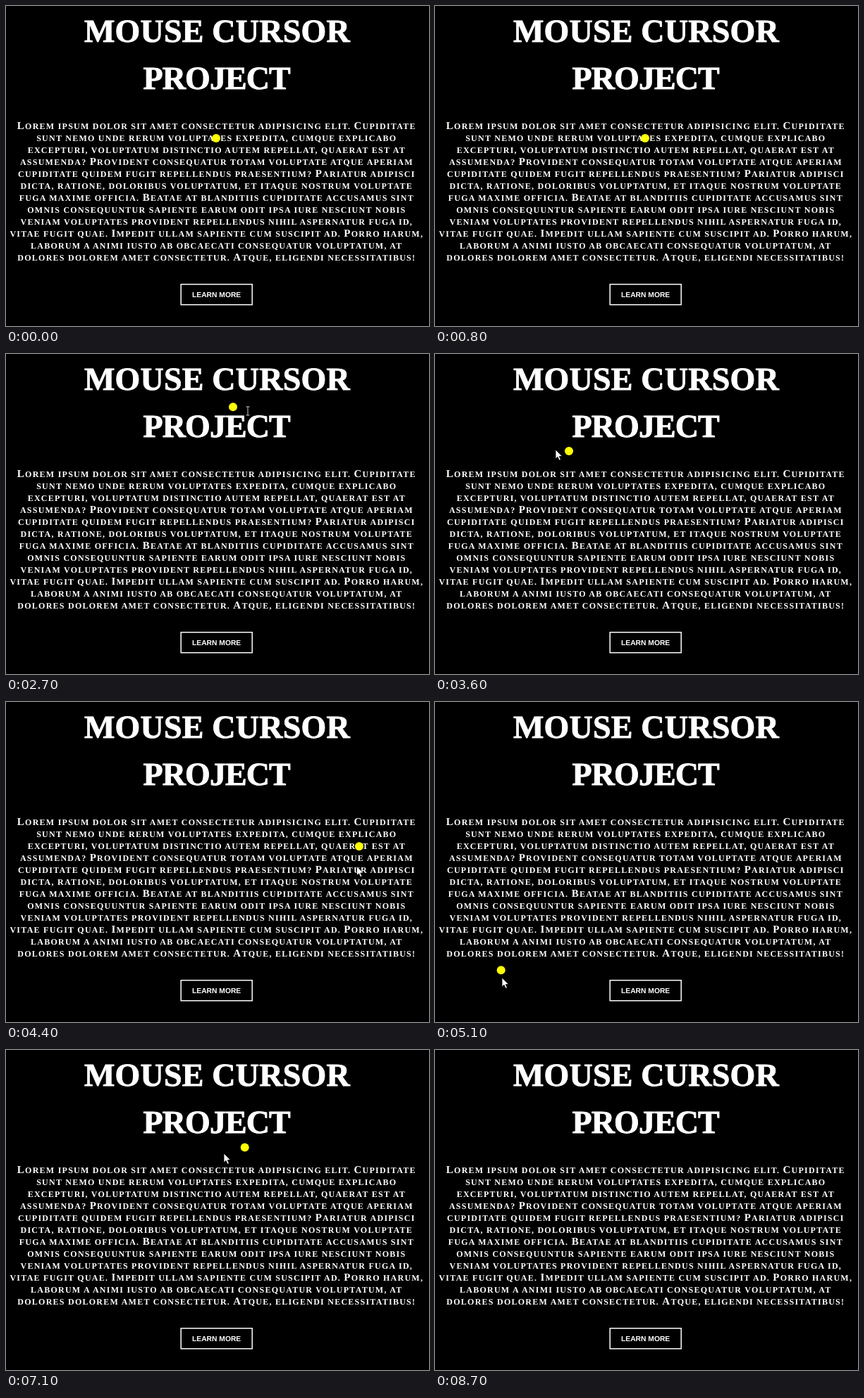
Recreate the animation shown at these times as an HTML page. Size 600 px wide and 455 px high, loop 8.9 s.

```html
<!DOCTYPE html>
<html lang="en">
<head>
<meta charset="utf-8">
<title>Mouse Cursor Project</title>
<style>
  html, body { margin: 0; width: 100%; height: 100%; overflow: hidden; background: #000; }
  svg { display: block; width: 600px; height: 455px; background: #000; }
  text { fill: #fff; text-anchor: middle; font-weight: bold; text-rendering: geometricPrecision; }
  .title { font-family: "Liberation Serif", serif; font-size: 46px; stroke: #fff; stroke-width: .9; }
  .body { font-family: "Liberation Serif", serif; font-size: 12px; letter-spacing: 1.25px; }
  .cap { font-size: 15px; }
  .button { font-family: "Liberation Sans", sans-serif; font-size: 10.3px; }
</style>
</head>
<body>
<svg viewBox="0 0 600 455">
  <text class="title" x="299.4" y="51" letter-spacing=".2">MOUSE CURSOR</text>
  <text class="title" x="298.7" y="117.5" letter-spacing="-.9">PROJECT</text>
  <g id="copy"></g>
  <rect x="248.2" y="395.7" width="101" height="29" fill="none" stroke="#fff" stroke-width="1.5"/>
  <text class="button" x="298.6" y="414">LEARN MORE</text>
  <circle id="dot" r="6" fill="#ff0"/>
  <path id="arrow" d="M0 0V13L3 10.3L5.2 15.2L7.4 14.2L5.3 9.5H9.4Z" fill="#fff" stroke="#000" stroke-width=".8"/>
  <path id="beam" d="M-2.5 -6H2.5M0 -6V6M-2.5 6H2.5" fill="none" stroke="#ccc"/>
</svg>
<script>
const LOOP = 8900, STEP = 100, LAG = 100;
const $ = id => document.getElementById(id);
const dot = $('dot'), arrow = $('arrow'), beam = $('beam');

const lines = [
  'Lorem ipsum dolor sit amet consectetur adipisicing elit. Cupiditate',
  'sunt nemo unde rerum voluptates expedita, cumque explicabo',
  'excepturi, voluptatum distinctio autem repellat, quaerat est at',
  'assumenda? Provident consequatur totam voluptate atque aperiam',
  'cupiditate quidem fugit repellendus praesentium? Pariatur adipisci',
  'dicta, ratione, doloribus voluptatum, et itaque nostrum voluptate',
  'fuga maxime officia. Beatae at blanditiis cupiditate accusamus sint',
  'omnis consequuntur sapiente earum odit ipsa iure nesciunt nobis',
  'veniam voluptates provident repellendus nihil aspernatur fuga id,',
  'vitae fugit quae. Impedit ullam sapiente cum suscipit ad. Porro harum,',
  'laborum a animi iusto ab obcaecati consequatur voluptatum, at',
  'dolores dolorem amet consectetur. Atque, eligendi necessitatibus!'
];

// Small capitals: big initials, reduced capitals for the rest.
const smallCaps = s => s.split(/([A-Z])/).map((part, i) =>
  i % 2 ? `<tspan class="cap">${part}</tspan>` : part.toUpperCase()).join('');

$('copy').innerHTML = lines.map((s, i) =>
  `<text class="body" x="298.8" y="${(175.4 + i * 16.95).toFixed(2)}">${smallCaps(s)}</text>`).join('');

// at: ms; pos and move: place and travel per step; swing: detour on the way to the next stop
const stops = [
  { at: 800,  pos: [298, 188], move: [0, 0],    swing: [230, -150] },
  { at: 1500, pos: [291, 339], move: [4, -2],   swing: [-220, 0] },
  { at: 2700, pos: [343, 81],  move: [21, 7],   swing: [160, 0] },
  { at: 3600, pos: [171, 136], move: [-15, -2], swing: [440, 0] },
  { at: 5100, pos: [95, 392],  move: [1, 10],   swing: [-310, -150] },
  { at: 7100, pos: [309, 147], move: [-30, 9],  swing: [-60, 150] },
  { at: 8200, pos: [300, -40], move: [0, -20] }
];
const first = stops[0], last = stops[stops.length - 1];

// Glide out of one stop and into the next, with a swing that fades at both ends.
function pointer(t) {
  if (t <= first.at) return first.pos;
  if (t >= last.at) return last.pos;
  const i = stops.findIndex(s => s.at > t);
  const a = stops[i - 1], b = stops[i];
  const u = (t - a.at) / (b.at - a.at);
  const mix = u ** 3 * (10 - 15 * u + 6 * u * u);
  const bump = Math.sin(Math.PI * u) ** 6;
  const wave = [bump, bump * Math.sin(2 * Math.PI * u)];
  return wave.map((w, k) => {
    const out = a.pos[k] + a.move[k] * (t - a.at) / STEP;
    const into = b.pos[k] + b.move[k] * (t - b.at) / STEP;
    return out + (into - out) * mix + a.swing[k] * w;
  });
}

function place(el, [x, y], visible = true) {
  el.setAttribute('transform', `translate(${x.toFixed(1)} ${y.toFixed(1)})`);
  el.setAttribute('visibility', visible ? 'visible' : 'hidden');
}

function draw(ms) {
  const t = Math.floor((ms % LOOP) / STEP) * STEP;
  const tip = pointer(t), shown = t > first.at;
  const overTitle = tip[1] < 125 && Math.abs(tip[0] - 300) < 190;
  place(dot, pointer(t - LAG));
  place(arrow, tip, shown && !overTitle);
  place(beam, tip, shown && overTitle);
}

const begin = performance.now();
function tick() {
  draw(performance.now() - begin);
  requestAnimationFrame(tick);
}
tick();
</script>
</body>
</html>
```
